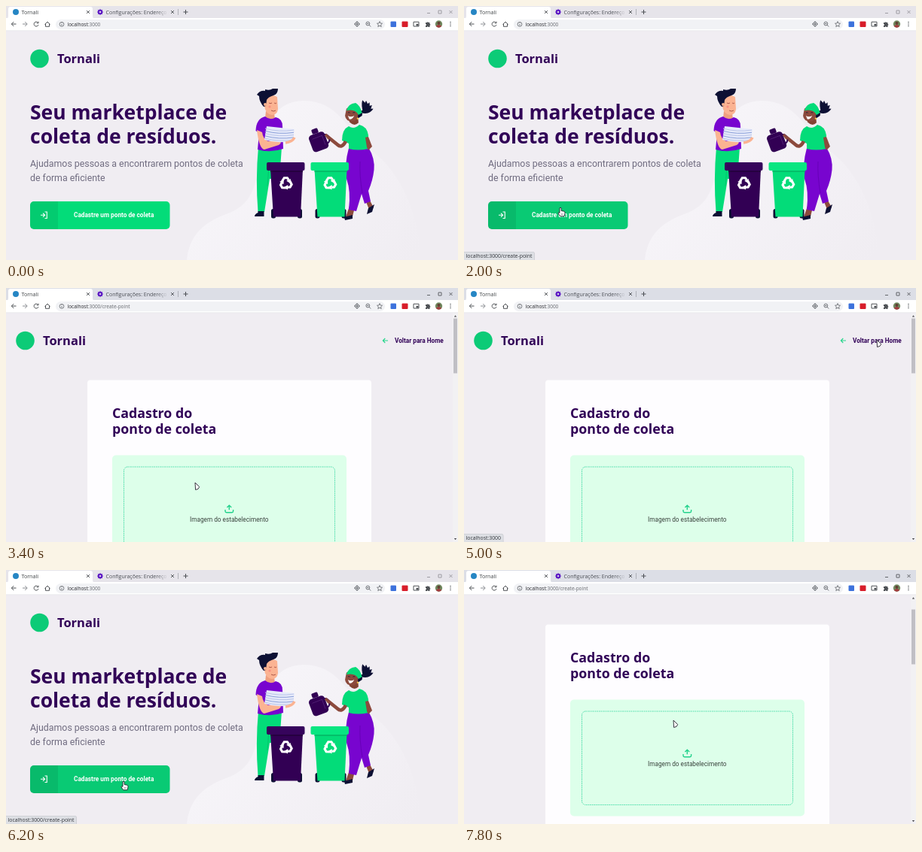
An HTML page with a canvas for the animation above (8 s loop, 600 px wide and 338 px high).

```html
<!DOCTYPE html>
<html lang="pt-BR">
<head>
<meta charset="utf-8">
<title>Tornali</title>
<style>
html, body { margin: 0; width: 100%; height: 100%; overflow: hidden; background: #f0edf2; }
canvas { display: block; width: 600px; height: 338px; }
</style>
</head>
<body>
<canvas id="stage"></canvas>
<script>
const LOOP = 8000, STEP = 200;
const INK = '#310257', GREEN = '#03dc79', PURPLE = '#7805cf', BG = '#f0edf2';
const NAVY = '#0d1034', GREY = '#5f6368', BIN = '#320054';
const HEAD = '"Open Sans", "Noto Sans", sans-serif', BODY = 'Roboto, sans-serif';

const canvas = document.getElementById('stage');
const ctx = canvas.getContext('2d');
const ratio = window.devicePixelRatio || 1;
canvas.width = 600 * ratio;
canvas.height = 338 * ratio;

function box(x, y, w, h, r, color) {
  ctx.beginPath();
  ctx.roundRect(x, y, w, h, r);
  ctx.fillStyle = color;
  ctx.fill();
}
function dot(x, y, r, color) {
  ctx.beginPath();
  ctx.arc(x, y, r, 0, 7);
  ctx.fillStyle = color;
  ctx.fill();
}
function ring(x, y, r, color, w = 0.9) {
  ctx.beginPath();
  ctx.arc(x, y, r, 0, 7);
  ctx.strokeStyle = color;
  ctx.lineWidth = w;
  ctx.stroke();
}
function fill(d, color) {
  ctx.fillStyle = color;
  ctx.fill(new Path2D(d));
}
function line(d, color, w = 1) {
  ctx.strokeStyle = color;
  ctx.lineWidth = w;
  ctx.stroke(new Path2D(d));
}
// Draws a string and returns the x where it ends
function text(s, x, y, font, color) {
  ctx.font = font;
  ctx.fillStyle = color;
  ctx.fillText(s, x, y);
  return x + ctx.measureText(s).width;
}
function at(x, y, draw, angle = 0, scale = 1) {
  ctx.save();
  ctx.translate(x, y);
  ctx.rotate(angle);
  ctx.scale(scale, scale);
  draw();
  ctx.restore();
}

// Pointer path: time, x, y
const PATH = [
  [200, 588, 6], [400, 520, 68], [600, 385, 150], [800, 255, 222], [1000, 165, 262],
  [1200, 138, 268], [2000, 128, 268], [2600, 128, 268], [3000, 210, 262],
  [3400, 251, 259], [3600, 300, 222], [4200, 515, 88], [4600, 548, 69], [5200, 548, 69],
  [5600, 360, 190], [6000, 165, 278], [6200, 156, 281], [6600, 162, 276],
  [7000, 286, 189], [7200, 281, 197], [7600, 278, 200], [LOOP, 278, 200]
];
function pointerAt(t) {
  const i = PATH.findIndex(p => p[0] > t);
  if (i < 1) return null;
  const [t0, x0, y0] = PATH[i - 1], [t1, x1, y1] = PATH[i];
  const k = (t - t0) / (t1 - t0);
  return [x0 + (x1 - x0) * k, y0 + (y1 - y0) * k];
}
const within = (t, a, b) => t >= a && t < b;

function sceneAt(t) {
  const form = within(t, 2400, 5200) || t >= 6600;
  const create = within(t, 2200, 5000) || t >= 6400;
  const onButton = !form && (within(t, 1000, 2400) || t >= 6000);
  let status = '';
  if (within(t, 1400, 2600) || within(t, 6200, 6600)) status = 'localhost:3000/create-point';
  if (within(t, 5000, 5400)) status = 'localhost:3000';
  const scroll = t >= 7200 ? 50 : t >= 7000 ? 3 : 0;
  return { form, create, onButton, status, scroll, pointer: pointerAt(t) };
}

function drawBrand(x, y) {
  dot(x + 12.5, y, 12.3, '#0ccb77');
  text('Tornali', x + 36, y + 6, `700 16.5px ${HEAD}`, INK);
}

function drawRecycle(x, y) {
  for (let i = 0; i < 3; i++) {
    at(x, y, () => {
      line('M-4.6 -2.4 L-2.1 -6.3 H1.5 L3 -4', '#fff', 2.7);
      fill('M.4 -2.9 L5.4 -5.3 L5.2 -.1Z', '#fff');
    }, i * Math.PI * 2 / 3, 1.15);
  }
}

function drawBin(x, body, lid, shade) {
  box(x + 6, 270, 6, 12.5, 2.5, NAVY);
  box(x + 41, 270, 6, 12.5, 2.5, NAVY);
  fill(`M${x + 5} 217 H${x + 48} L${x + 45} 280.5 H${x + 9}Z`, body);
  box(x + 5, 218, 43, 3, 0, shade);
  box(x, 208, 50.5, 11, 2, lid);
  drawRecycle(x + 25.7, 236);
}

function drawMan() {
  const skin = '#fbb392';
  fill('M335 188 H366 L363 230 H350 L343 274 H334.5 Q331 230 335 188Z', GREEN);
  line('M349 212 L347 240', '#04bf6a', 0.8);
  fill('M334.5 273 H342.5 V280 H330 Q330 277 334.5 275Z', NAVY);
  fill('M345 140 L356 142 L357 151 Q350 154 344 149Z', '#ef9f7f');
  fill('M343 121 Q352 116 360 121 L361 137 Q360 145 353 145 Q345 144 343 134Z', skin);
  fill('M342 134 Q336 127 336 120 L333 118 Q337 112 344 113 L344 111 Q350 113 354 110 L361 110 Q361 117 355 119 Q348 121 346 125 L345 133Z', NAVY);
  dot(344, 131, 2, skin);
  line('M349 129 q2 1.5 4 0 M356 129 q2 1.5 3 0 M352 139 q3 2 6 0', '#9c4338', 0.8);
  dot(350, 134, 1.6, '#f98f83');
  fill('M344 147 Q351 153 358 148 Q367 150 367 160 L368 190 Q350 196 334 191 L336 169 L331.5 166 Q332 150 344 147Z', PURPLE);
  fill('M333 165 L340 168 Q341 177 348 180 L363 179 Q367 182 362 185 L343 191 Q336 190 333 165Z', skin);
  // Stack of papers
  fill('M346 160 L383 164 L381 179 Q362 184 343 178Z', '#e6eafa');
  for (let i = 0; i < 5; i++) {
    const y = 163 + i * 3.3;
    line(`M344 ${y} Q362 ${y + 5} 382 ${y + 2}`, i % 2 ? '#8ba0d9' : '#b9c4e8', 1);
  }
  line('M371 182 Q380 181 383 175', skin, 3.6);
}

function drawWomanHead(skin) {
  fill('M456 151 L467 151 L468 162 Q462 168 455 161Z', '#824232');
  fill('M451 142 Q461 137 469 146 Q471 155 462 160 Q450 161 449 152Z', skin);
  fill('M468 143 Q475 145 473 152 L467 156Z', NAVY);
  fill('M451 145 Q453 135 464 134 Q470 137 473 148 L468 151 Q463 142 451 145Z', GREEN);
  line('M453 148 q1.5 -1 3 0 M460 148 q2 -1 3 0', NAVY, 0.8);
  fill('M453 152 Q457 155 462 152 Q459 158 455 157Z', '#fff');
  dot(467, 156, 1.3, '#f4c84d');
}

function drawWoman() {
  const skin = '#8c4a3d';
  fill('M456 266 L463 268 L460 280 L453 284 L451 281Z', skin);
  fill('M476 256 L482 257 L488 268 L483 273Z', skin);
  fill('M449 281 L460 278 L460 283 L450 285Z M481 269 L489 264 L486 274 L479 277Z', NAVY);
  fill('M455 189 L481 188 Q490 203 488.5 218 Q487 232 481 246 L484 260 L476 263 L472 250 L465 273 L455 271 Q458 246 452 230 Q449 211 455 189Z', PURPLE);
  line('M473 249 Q469 225 470 207', '#6200b0', 0.8);
  // Hair and bun
  for (let i = 0; i < 5; i++) {
    at(474, 139, () => fill('M-1 3 Q0 -8 6 -15 Q11 -6 3 3Z', NAVY), -0.45 + i * 0.37, 0.85);
  }
  at(28, 3, () => drawWomanHead(skin), 0, 0.94);
  // Top
  fill('M455 160 Q462 165 469 158 Q479 160 481 172 L481 190 Q467 193 455 190 L455 183 L446 179 Q446 164 455 160Z', GREEN);
  fill('M477 175 L481 174 L486 187 L481 192 L479 188Z', skin);
  line('M451 180 Q446 190 440 184.5 L427 174', skin, 4.6);
  at(415, 180.5, () => {
    box(-4, -18, 8.5, 6.5, 1.5, BIN);
    box(-11, -11.5, 22, 23.5, 4.5, BIN);
    line('M10.5 -6 q5 1 4 8 q-1 4 -5 4', BIN, 2);
    line('M-7 -6 H7 V7', '#512276', 0.9);
  }, -0.36);
  line('M424 171 L430 177', skin, 3.6);
}

function drawHome(hover) {
  box(0, 33, 600, 305, 0, BG);
  const fade = ctx.createLinearGradient(320, 150, 540, 338);
  fade.addColorStop(0, '#f7f5f9');
  fade.addColorStop(1, BG);
  fill('M240 338 C243 306 262 288 292 277 C318 268 330 250 333 222 C340 152 360 127 395 126 C440 126 453 164 479 188 C516 212 545 260 552 338Z', fade);
  drawBrand(32, 70);
  const title = `700 26.5px ${HEAD}`, lead = `400 12.36px ${BODY}`;
  text('Seu marketplace de', 32, 151, title, INK);
  text('coleta de resíduos.', 32, 183, title, INK);
  text('Ajudamos pessoas a encontrarem pontos de coleta', 32, 214, lead, '#706c80');
  text('de forma eficiente', 32, 233, lead, '#706c80');

  box(32, 260, 185.5, 37, 5, hover ? '#09ca74' : GREEN);
  box(32, 260, 37, 37, [5, 0, 0, 5], 'rgba(0,0,0,.08)');
  line('M51.5 274 H54.3 V282.5 H51.5 M46 278.3 H51.3 M49 275.7 L51.6 278.3 L49 280.9', '#fff', 1.1);
  text('Cadastre um ponto de coleta', 90, 281, `700 8.24px ${BODY}`, '#fff');

  drawMan();
  drawWoman();
  drawBin(346, BIN, '#36045c', '#260040');
  drawBin(404.5, GREEN, '#08e681', '#03bf69');
}

function drawForm(scroll) {
  box(0, 33, 600, 305, 0, BG);
  ctx.save();
  ctx.beginPath();
  ctx.rect(0, 33, 593, 305);
  ctx.clip();
  ctx.translate(0, -scroll);
  drawBrand(13, 70);
  line('M507 70 H500.5 M503.3 67 L500.3 70 L503.3 73', '#25d58a', 1.1);
  text('Voltar para Home', 516, 73, `700 8.24px ${BODY}`, INK);

  box(108, 122.5, 377, 400, 4, '#fefdff');
  text('Cadastro do', 141, 173, `700 17.8px ${HEAD}`, INK);
  text('ponto de coleta', 141, 194, `700 17.8px ${HEAD}`, INK);
  box(141, 222.5, 311, 155, 5, '#ddffea');
  ctx.setLineDash([1.5, 1]);
  ctx.beginPath();
  ctx.roundRect(156.5, 238, 280, 124.5, 5);
  ctx.strokeStyle = '#4bdcaa';
  ctx.lineWidth = 1;
  ctx.stroke();
  ctx.setLineDash([]);
  line('M291 295 V297 Q291 298.7 292.7 298.7 H300 Q301.6 298.7 301.6 297 V295 M296.3 295.3 V289.5 M293.4 292 L296.3 289.2 L299.2 292', '#22d18b', 1.4);
  text('Imagem do estabelecimento', 244, 311, `400 8.24px ${BODY}`, '#3b443f');
  ctx.restore();

  box(593, 33, 7, 305, 0, '#f2f1f3');
  box(594, 40.5 + scroll * 0.24, 5, 73, 0, '#c0bfc4');
  fill('M594.8 38.5 L596.5 36.3 L598.2 38.5Z M594.8 333 H598.2 L596.5 335.2Z', '#505055');
}

function drawTabs(form) {
  box(0, 0, 600, 17, 0, form ? '#dcdee6' : '#e6e4ea');
  fill('M0 17 Q3 17 3 13 V4 Q3 1 6 1 H112 Q115 1 115 4 V13 Q115 17 118 17Z', '#fff');
  dot(13, 8, 4, '#2686c4');
  text('Tornali', 20.5, 10.5, `400 7.1px ${HEAD}`, '#3c4043');
  line('M107 6 l4 4 m0 -4 l-4 4', '#4b4e53', 0.9);

  for (let i = 0; i < 8; i++) {
    at(125, 8, () => box(-0.8, -3.8, 1.6, 2.6, 0.4, '#5a14c4'), i * Math.PI / 4);
  }
  ring(125, 8, 2.1, '#5a14c4', 1.5);
  const fade = ctx.createLinearGradient(200, 0, 215, 0);
  fade.addColorStop(0, '#4b4e55');
  fade.addColorStop(1, 'rgba(75,78,85,0)');
  text('Configurações: Endereço', 132.5, 10.5, `400 7px ${HEAD}`, fade);
  line('M219 6 l4 4 m0 -4 l-4 4', '#4b4e53', 0.9);
  line('M228.5 4 V12', '#9a9ca4', 0.7);
  line('M235.5 8 H241.5 M238.5 5 V11', '#4b4e53', 1);
  line('M559 9.5 H563 M574 6 H578 V10 H574Z M588.5 6 l4 4 m0 -4 l-4 4', form ? '#55575c' : '#96959b', 0.9);
}

function drawToolbar(create) {
  box(0, 16, 600, 17, 0, '#fff');
  box(0, 32.5, 600, 0.7, 0, '#e2e1e6');
  line('M13.5 24 H7.5 M10.3 21 L7.3 24 L10.3 27', '#4f5256', 1);
  line('M22 24 H28 M25.2 21 L28.2 24 L25.2 27', '#8b8e93', 1);
  line('M42.5 22.2 A3 3 0 1 0 43 25 M43 20.7 V22.8 H40.8', '#4f5256', 1);
  line('M51.5 24.5 L55 21 L58.5 24.5 M52.5 24 V27.3 H57.5 V24', '#4f5256', 1);

  box(66, 18, 437, 13, 6.5, '#f1f2f5');
  ring(74, 24.3, 2.9, GREY, 0.8);
  line('M74 24 V26 M74 22.3 V23.1', GREY, 0.8);
  const font = `400 6.5px ${HEAD}`;
  const end = text('localhost', 81.5, 26.6, font, '#25262b');
  text(create ? ':3000/create-point' : ':3000', end, 26.6, font, '#64676d');

  ring(466, 24, 2.6, GREY);
  dot(466, 24, 1.2, GREY);
  line('M466 20 V22 M466 26 V28 M462 24 H464 M468 24 H470', GREY, 0.8);
  ring(480.3, 23.5, 2.4, GREY);
  line('M482 25.2 L484.2 27.5 M479 23.5 H481.6', GREY, 0.9);
  line('M496 20.5 L497 23 L499.5 23.2 L497.6 25 L498.2 27.6 L496 26.2 L493.8 27.6 L494.4 25 L492.5 23.2 L495 23Z', GREY, 0.8);

  box(510.5, 20.5, 7.5, 7.5, 1, '#3d72dc');
  box(525.5, 20.5, 8, 7.5, 1, '#d81e2b');
  line('M541 21.2 H548 V27 H541Z', '#4f5256', 1);
  box(544.5, 23.8, 3, 2.6, 0, '#4f5256');
  fill('M557 22 H558.8 A1.2 1.2 0 0 1 561 22 H562.5 V23.7 A1.2 1.2 0 0 1 562.5 26 V28 H560.7 A1 1 0 0 0 558.8 28 H557 V26 A1 1 0 0 0 557 24Z', '#4f5256');
  dot(574.5, 24, 4.7, '#718a60');
  fill('M570.7 26.7 Q574.5 23.5 578.3 26.7 Q574.5 31 570.7 26.7Z', '#a33c3e');
  dot(574.5, 22.8, 2.1, '#624034');
  for (const y of [21.4, 24, 26.6]) dot(590, y, 0.75, '#4f5256');
}

function drawStatus(s) {
  ctx.font = `400 6.9px ${HEAD}`;
  const w = ctx.measureText(s).width + 6;
  box(-1, 327, w + 1, 12, [0, 3, 0, 0], '#c4c6cb');
  box(-1, 327.6, w + 0.4, 12, [0, 2.5, 0, 0], '#dddfe4');
  text(s, 2.5, 335.2, ctx.font, '#33363c');
}

function drawPointer([x, y], hand) {
  ctx.lineJoin = 'round';
  at(x, y, () => {
    const d = hand
      ? 'M-1 .8 Q0 -.5 1.1 .8 V4.5 L4.8 5.2 Q6.3 5.7 6 7.5 L5.2 11.7 H-.4 L-3 7.8 Q-3 6 -1 7.3Z'
      : 'M0 0 L5.7 5.6 L4 8.4 L.6 9.5Z';
    fill(d, '#fff');
    line(d, '#25202d', 0.9);
    if (hand) line('M1.2 8 V10 M3 8 V10', '#25202d', 0.5);
  });
}

function draw(now) {
  const t = Math.floor(now % LOOP / STEP) * STEP;
  const s = sceneAt(t);
  ctx.setTransform(ratio, 0, 0, ratio, 0, 0);
  ctx.lineJoin = 'miter';
  if (s.form) drawForm(s.scroll);
  else drawHome(s.onButton);
  drawTabs(s.form);
  drawToolbar(s.create);
  if (s.status) drawStatus(s.status);
  if (s.pointer) drawPointer(s.pointer, s.onButton);
}

const start = performance.now();
function tick() {
  draw(performance.now() - start);
  requestAnimationFrame(tick);
}
tick();
</script>
</body>
</html>
```
